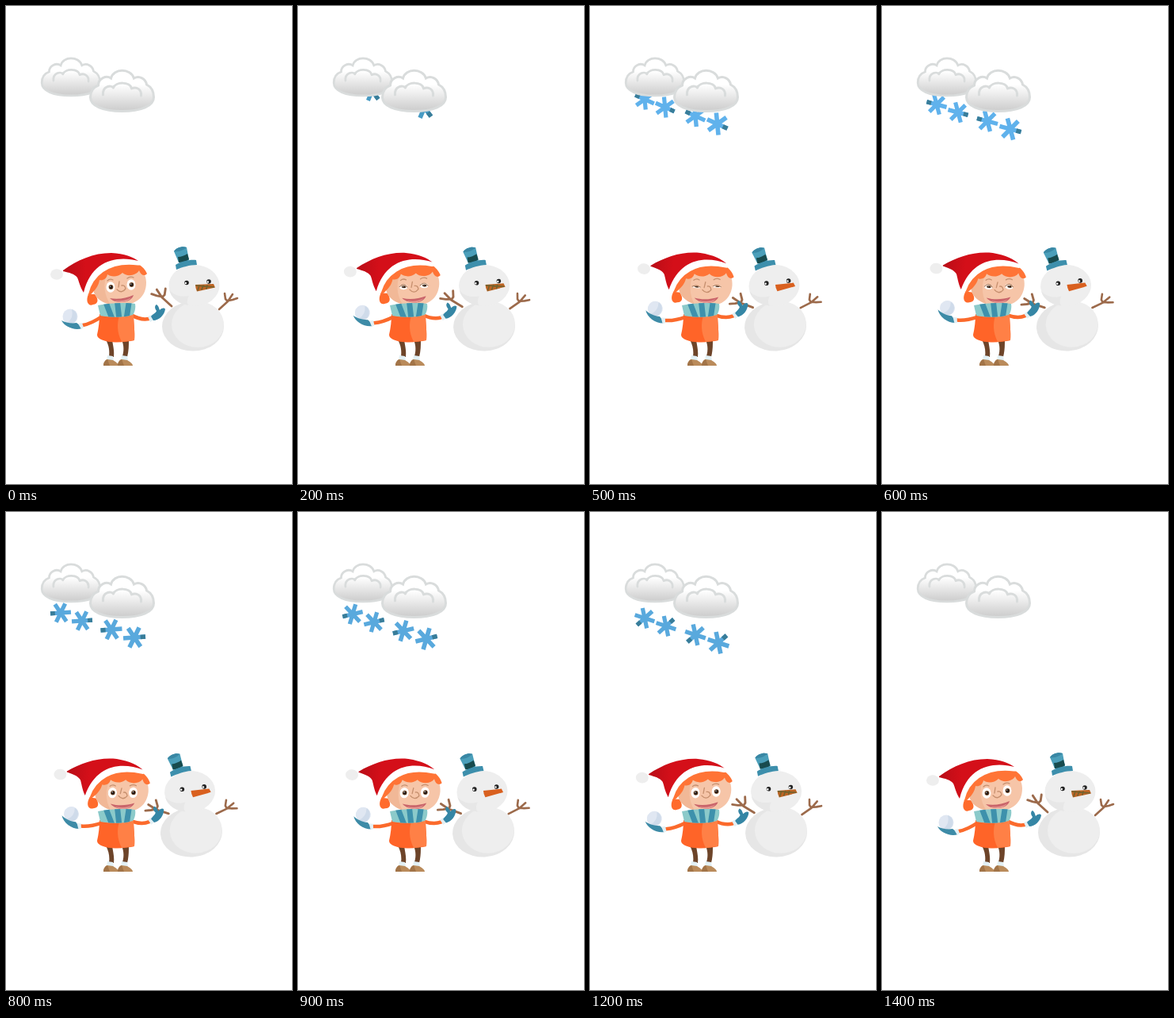
Write an HTML page that moves like this. It is 361 by 602 pixels and loops after 1500 ms.

```html
<!DOCTYPE html>
<html lang="en">
<head>
<meta charset="utf-8">
<title>Winter scene</title>
<style>
  html, body { margin: 0; width: 100%; height: 100%; overflow: hidden; background: #fff; }
  svg { display: block; width: 100%; height: 100%; }
  .line { fill: none; stroke-linecap: round; stroke-linejoin: round; }
</style>
</head>
<body>
<svg viewBox="0 0 361 602">
  <defs>
    <linearGradient id="mist" x1="0" y1="0" x2="0" y2="1">
      <stop offset=".35" stop-color="#fff"/>
      <stop offset="1" stop-color="#cbcbcb"/>
    </linearGradient>
    <linearGradient id="felt">
      <stop offset="0" stop-color="#b90d17"/>
      <stop offset=".3" stop-color="#d40f19"/>
    </linearGradient>
    <clipPath id="scarfClip">
      <path d="M116 377C130 374 150 373 163 375C164 381 162 387 160 389C147 393 130 392 119 390Z"/>
    </clipPath>
    <g id="cloud">
      <path d="M-40 8C-40 0-36-5-30-7C-30-16-20-20-14-16C-11-29 11-29 15-16C22-20 30-15 31-8C37-5 40 1 40 8C40 19 24 25.500 0 25.500C-24 25.500-40 19-40 8Z" fill="url(#mist)" stroke="#d9dcdc" stroke-width="3"/>
      <path class="line" d="M-24 5C-25-6-14-8-11-4C-8-12 10-12 12-3C18-6 25-2 24 6" stroke="#d9dcdc" stroke-width="3"/>
    </g>
    <g id="twig" class="line" stroke="#9c6a4b" stroke-width="2.600">
      <path d="M0 0L11-10L17-19M11-10L8-13L7-20M12-11L17-12L23-14"/>
    </g>
    <g id="shoe">
      <path d="M5 440L12 441L13 447L4 447Z" fill="#e2f0f5"/>
      <path d="M0 453C0 449 2 446 5 445L12 446C15 448 19 450 19 453Z" fill="#ba8b5b"/>
      <path d="M0 453C0 449 2 446 5 445L8 453Z" fill="#a27448"/>
    </g>
  </defs>

  <g id="flakes"></g>
  <use href="#cloud" transform="translate(82 89.500) scale(.92)"/>
  <use href="#cloud" transform="translate(146.500 107)"/>

  <g id="snowman">
    <g id="twigL"><use href="#twig" transform="translate(209 378) scale(-1.100 1.100)"/></g>
    <g id="twigR"><use href="#twig" transform="translate(269 382)"/></g>
    <ellipse cx="236" cy="403.500" rx="39" ry="31" fill="#e6e6e6"/>
    <ellipse cx="242" cy="401" rx="33" ry="29" fill="#eee"/>
    <ellipse cx="237.500" cy="352" rx="32" ry="26" fill="#eee"/>
    <path d="M206 357C212 365 222 367 231 365C228 370 228 375 231 377C219 376 208 368 206 357Z" fill="#e7e7e7"/>
    <circle cx="228" cy="348.500" r="2.800" fill="#222"/>
    <circle cx="256" cy="347" r="2.800" fill="#222"/>
    <circle cx="226.800" cy="349" r="1.200" fill="#fff"/>
    <circle cx="254.800" cy="347.500" r="1.200" fill="#fff"/>
    <path id="nose" d="M239 351L262 350L264 354.500L241 359.500Q239 355 239 351Z"/>
    <path id="noseShade" class="line" d="M240 352L262 354M244 352L242 358M249 352L247 357M254 352L253 356" stroke="#71612d" stroke-width="1.600"/>
    <path d="M212 309C215 304 223 302 228 304L231 320C227 323 221 324 218 323Z" fill="#4b9fba"/>
    <path d="M217 316C221 316 226 314 229 312L231 319C227 322 222 323 218 323Z" fill="#184b4e"/>
    <path d="M212 309C215 304 223 302 228 304C224 308 217 310 212 309Z" fill="#3987a4"/>
    <path d="M214 326C220 322 232 319 240 320L241 326C232 326 222 329 215 332Z" fill="#3d8fac"/>
  </g>

  <path d="M126 420L134 420C135 428 137 434 136 442L130 442C131 434 130 428 126 420Z" fill="#6d4429"/>
  <path d="M146 420L155 420C155 428 155 434 153 442L147 441C149 434 149 428 146 420Z" fill="#6d4429"/>
  <use href="#shoe" x="123"/>
  <use href="#shoe" x="141"/>

  <g id="armL">
    <path class="line" d="M121 391Q108 400 97 402" stroke="#fb6a2c" stroke-width="4.500"/>
    <circle cx="81" cy="391" r="9.500" fill="#e0e7f2"/>
    <path d="M83 382A9.500 9.500 0 0 1 83 400L77 399Q86 393 83 382Z" fill="#cfdbea"/>
    <path d="M70 396C75 399 83 400 89 399Q93 401 96 406C86 409 74 404 70 396Z" fill="#3d8ba7"/>
    <path d="M91 400L96 399L98 405L95 407Z" fill="#e2f0f5"/>
  </g>
  <g id="armR">
    <path class="line" d="M158 389Q170 396 180 394" stroke="#fb6a2c" stroke-width="4.500"/>
    <path d="M179 391L184 389L187 395L182 398Z" fill="#e2f0f5"/>
    <path d="M183 391C185 388 189 387 190 384C187 380 188 377 190 376C193 378 193 381 194 383C197 380 200 380 201 382C200 389 193 396 186 396Z" fill="#3586a5"/>
  </g>
  <path d="M118 388C131 391 150 391 161 387C161 399 163 411 162 421C150 424 130 425 120 420C117 418 115 417 115 414C117 405 118 397 118 388Z" fill="#ff6428"/>
  <path d="M143 390C151 390 157 389 161 387C161 399 163 411 162 421L146 423C140 411 140 400 143 390Z" fill="#ff8046"/>

  <g id="head">
    <path d="M104 363C100 372 104 379 110 376C117 375 117 369 112 363Z" fill="#ff6b2c"/>
    <path d="M110 350C108 366 122 376 142 377C165 377 177 366 177 348C177 330 160 324 143 325C122 326 111 338 110 350Z" fill="#f6c5a8"/>
    <path d="M110 350C108 364 118 373 132 376C124 365 122 350 128 334C116 338 111 343 110 350Z" fill="#f1b897"/>
    <path d="M103 363C104 345 114 328 135 322C155 317 173 324 178 337C175 341 170 339 168 333C164 340 152 341 147 336C141 342 132 341 128 338C127 344 122 346 118 345C117 352 113 357 110 360C107 364 104 366 103 363Z" fill="#ff7436"/>
    <g class="eye" data-x="132" data-y="354"></g>
    <g class="eye" data-x="158" data-y="351"></g>
    <path class="line" d="M128 346Q131 343 135 345M153 343Q157 340 161 342M143 347L142 354M140 357Q146 363 151 356Q150 351 146 352" stroke="#c68f6e" stroke-width="1.300"/>
    <path d="M131 368C141 370 152 368 161 364C160 369 153 373 146 373C139 373 134 371 131 368Z" fill="#c9646a"/>
    <path d="M137 371C144 372 153 371 158 367C155 371 151 373 146 373C142 373 139 372 137 371Z" fill="#e79a94"/>
    <path class="line" d="M101 361C106 340 126 318 167 323" stroke="#fff" stroke-width="7"/>
    <path d="M72 333C90 320 110 311 133 311C150 312 160 316 167 321C140 314 108 320 98 361C93 353 92 346 90 342C86 337 80 336 72 334Z" fill="url(#felt)"/>
    <ellipse cx="64" cy="338" rx="8" ry="6.800" fill="#eee"/>
  </g>
  <g clip-path="url(#scarfClip)">
    <rect x="112" y="370" width="56" height="26" fill="#8bcaca"/>
    <path d="M124 368L134 394M140 368L143 395M156 368L152 394" fill="none" stroke="#3e91ac" stroke-width="7"/>
  </g>
</svg>
<script>
const LOOP = 1500, STEP = 100;
const $ = id => document.getElementById(id);
const turn = (id, deg, x, y) => $(id).setAttribute('transform', `rotate(${deg} ${x} ${y})`);

// Resting centre of each flake, radius, and side its dark arm faces
const flakes = [[69, 124, 13, 1], [96, 134, 13, -1], [133, 145, 13.5, 1], [162, 155, 14, -1]];
const drop = [[0, -38], [200, -27], [400, -13], [600, 0], [800, 3], [1100, 8], [1400, 13]];

const arms = [0, 60, 120].map(a => {
  const x = Math.cos(a * Math.PI / 180), y = Math.sin(a * Math.PI / 180);
  return `M${-x} ${-y}L${x} ${y}`;
}).join('');
$('flakes').innerHTML = flakes.map(() =>
  `<g stroke-width=".4"><path d="${arms}"/><path d="M-.55 0H-1" stroke="#397d99"/></g>`).join('');
const flakeNodes = [...$('flakes').children];

const eyes = [...document.querySelectorAll('.eye')];
for (const eye of eyes) {
  eye.setAttribute('transform', `translate(${eye.dataset.x} ${eye.dataset.y})`);
  eye.innerHTML = `<g><ellipse rx="5.5" ry="6.7" fill="#fff"/><circle cx=".5" r="2.9" fill="#80532f"/>
    <circle cx=".5" r="2.2" fill="#241a16"/><circle cx="-.3" cy="-.9" r=".7" fill="#fff"/></g>
    <path class="line" stroke="#b07d5c" stroke-width="1.2"/>`;
}

function track(points, t) {
  const i = Math.max(1, points.findIndex(p => p[0] >= t));
  const [t0, a] = points[i - 1], [t1, b] = points[i];
  return a + (b - a) * (t - t0) / (t1 - t0);
}

function drawFlakes(t) {
  const visible = t > 0 && t < 1400;
  const y = track(drop, t);
  const spin = 15 - (t - 600) * .095;
  const color = t < 300 ? '#489bc4' : t < 700 ? '#60b2ec' : '#59a9dd';
  flakeNodes.forEach((node, i) => {
    const [cx, cy, r, side] = flakes[i];
    const dx = side < 0 ? Math.max(-2.5, Math.min(0, y * .2)) : 0;
    node.setAttribute('visibility', visible ? 'visible' : 'hidden');
    node.setAttribute('stroke', color);
    node.setAttribute('transform',
      `translate(${cx + dx} ${cy + y}) scale(${r * side}) rotate(${spin})`);
  });
}

function drawEyes(t) {
  const lid = Math.max(0, 1 - Math.abs(t - 400) / 400);
  for (const eye of eyes) {
    const [ball, lash] = eye.children;
    ball.setAttribute('transform', `scale(1 ${1 - lid})`);
    ball.setAttribute('visibility', lid < 1 ? 'visible' : 'hidden');
    lash.setAttribute('d', `M-5 0Q0 ${lid < 1 ? -12 * (1 - lid) : 4} 5 0`);
    lash.setAttribute('visibility', lid > 0 ? 'visible' : 'hidden');
  }
}

function draw(t) {
  const sway = Math.sin(Math.PI * t / 1400);
  turn('head', 6.2 * sway, 137, 376);
  turn('armL', 16.5 * sway, 119, 391);
  turn('armR', -11 * sway, 160, 388);
  turn('snowman', -3.8 * sway, 236, 436);
  turn('twigL', -21 * sway, 209, 378);
  turn('twigR', 21 * sway, 269, 382);
  const bright = sway > .9;
  $('nose').setAttribute('fill', bright ? '#d9601f' : '#bd6424');
  $('noseShade').setAttribute('visibility', bright ? 'hidden' : 'visible');
  drawFlakes(t);
  drawEyes(t);
}

const start = performance.now();
function tick() {
  const t = (performance.now() - start) % LOOP;
  draw(Math.floor(t / STEP) * STEP);
  requestAnimationFrame(tick);
}
tick();
</script>
</body>
</html>
```
